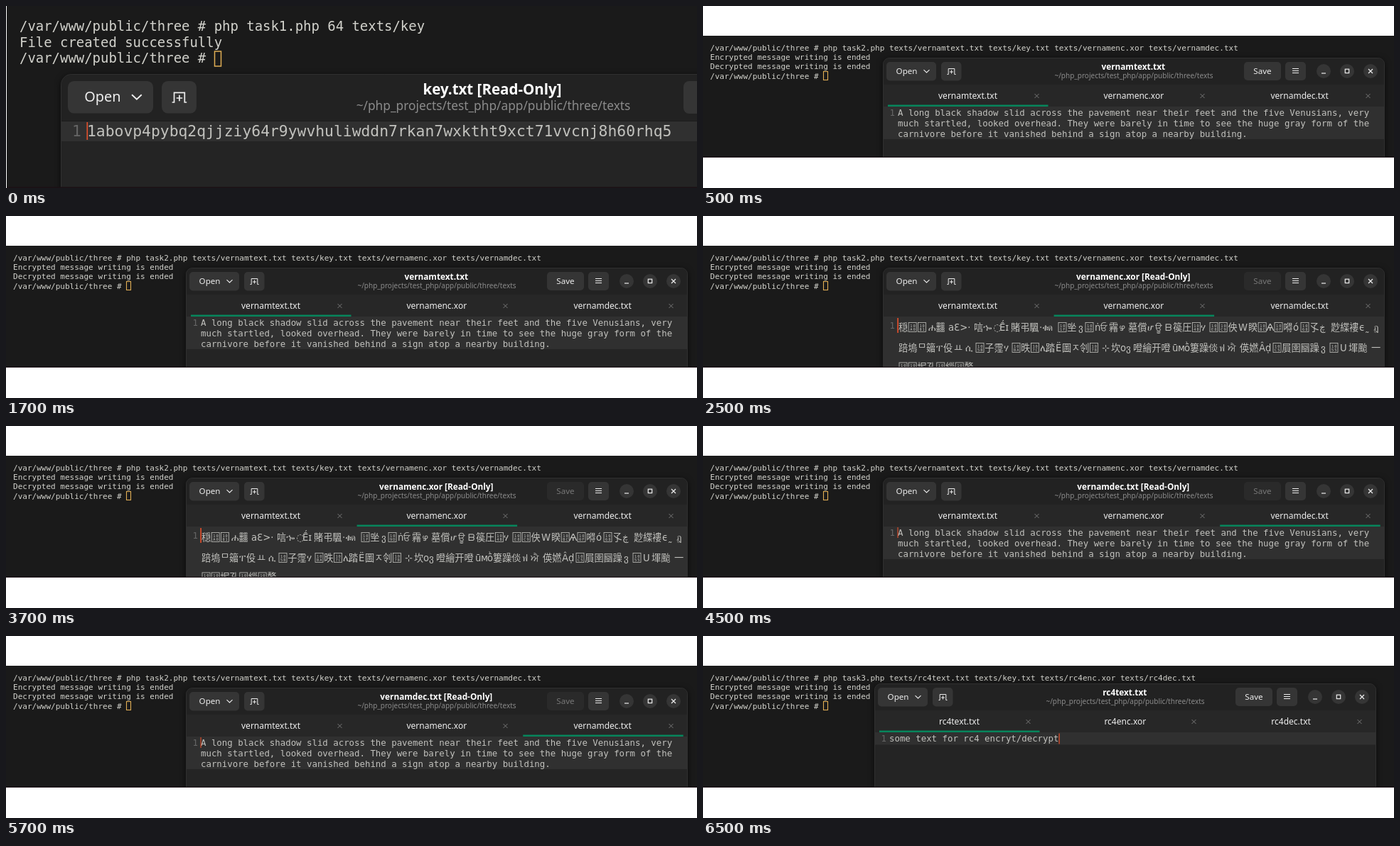
An HTML page with a canvas for the animation above (8000 ms loop, 972 by 257 pixels).

```html
<!DOCTYPE html>
<html lang="en">
<head>
<meta charset="utf-8">
<title>Cipher tasks</title>
<style>
html, body { margin: 0; width: 100%; height: 100%; overflow: hidden; background: #fff; }
canvas { display: block; width: 972px; height: 257px; }
</style>
</head>
<body>
<canvas id="stage" width="972" height="257"></canvas>
<script>
const ctx = document.getElementById('stage').getContext('2d');
const MONO = '"DejaVu Sans Mono", "Liberation Mono", monospace';
const SANS = '"Noto Sans", "Open Sans", sans-serif';
const MIXED = '"DejaVu Sans", "Noto Sans CJK SC", "Noto Sans CJK JP", "Noto Sans", sans-serif';
const C = {
  term: '#1a1a1a', termText: '#d2d2cc', caret: '#e0ae55', win: '#242424', line: '#303030',
  head: '#222222', edge: '#303030', button: '#353535', ui: '#eeeeee', dim: '#8b8b8b',
  text: '#c2c2be', number: '#666666', green: '#07855c', red: '#e8512c'
};
const PROMPT = '/var/www/public/three # ';
const FOLDER = '~/php_projects/test_php/app/public/three/texts';
const STORY = [
  'A long black shadow slid across the pavement near their feet and the five Venusians, very',
  'much startled, looked overhead. They were barely in time to see the huge gray form of the',
  'carnivore before it vanished behind a sign atop a nearby building.'
];

// Runs of mixed scripts; □ stands for a missing-glyph box.
const CIPHER = [
  [161.5, [[275, '穏□□'], [317, 'ሐ䨻'], [345, 'aԐ>·'], [381, '唁ኈ'], [408, '◌'], [417, 'Ḗɪ'],
    [433, '賭弔颿'], [473, '·ቁ'], [485, 'ด'], [499, '□㘴'], [528, 'ვ'], [537, '□'], [551, 'ṅ'],
    [559, 'ਓ'], [571, '霿'], [585, 'ഴ'], [598, '墓償'], [625, 'ሆ'], [636, 'ਊ'], [650, 'ᗷ'], [661, '篌圧□'],
    [700, 'ሃ'], [712, '□□佒'], [753, 'W'], [767, '睽□'], [792, 'Ѧ'], [803, '□嘚'], [830, 'ό'],
    [840, '□孓'], [867, 'ڿ'], [883, '尟緤褸'], [923, 'ϵ˷'], [943, 'ฎ']]],
  [190.5, [[275, '踣塢'], [302, 'ᄆ'], [314, '䉋'], [328, 'ፐ'], [338, '伇'], [353, 'ㅛ'],
    [369, 'ሲ'], [383, '□子霪'], [423, 'ሃ'], [434, '□昳□'], [474, 'ሊ'], [482, '踏'], [496, 'Ë'],
    [505, '圖ㅈ刢□'], [561, '⊹'], [574, '坎'], [587, 'o'], [595, 'ვ'], [605, '噔繪开噔'],
    [660, 'ū'], [668, 'м'], [677, 'ṑ'], [685, '簍躁倓'], [726, 'ฟ'], [738, 'ਐ'], [755, '偀㜣'],
    [782, 'Âḍ'], [801, '□屓圉圝躁'], [869, 'ვ'], [881, '□'], [896, 'Ս'], [908, '堚颱'], [940, '一']]],
  [218, [[275, '□□坭孔□緇□鷔']]]
];

function fill(color, x, y, w, h, r = 0) {
  ctx.fillStyle = color;
  ctx.beginPath();
  ctx.roundRect(x, y, w, h, r);
  ctx.fill();
}

function stroke(color, width, ...lines) {
  ctx.strokeStyle = color;
  ctx.lineWidth = width;
  ctx.beginPath();
  for (const points of lines) points.forEach(([x, y], i) => i ? ctx.lineTo(x, y) : ctx.moveTo(x, y));
  ctx.stroke();
}

function text(str, x, y, size, color, font = MONO, align = 'left', weight = 400) {
  ctx.font = `${weight} ${size}px ${font}`;
  ctx.textAlign = align;
  ctx.fillStyle = color;
  ctx.fillText(str, x, y);
}

function terminal(lines, x, y, size, step) {
  lines.forEach((line, i) => text(line, x, y + i * step, size, C.termText));
}

function caretBox(x, y, w, h, line) {
  ctx.strokeStyle = C.caret;
  ctx.lineWidth = line;
  ctx.strokeRect(x, y, w, h);
}

function frame(x, y, w, h, r) {
  ctx.save();
  ctx.shadowColor = 'rgba(0,0,0,.6)';
  ctx.shadowBlur = 9;
  ctx.shadowOffsetY = 2;
  fill(C.win, x, y, w, h, r);
  ctx.restore();
  ctx.strokeStyle = C.edge;
  ctx.lineWidth = 1;
  ctx.beginPath();
  ctx.roundRect(x + .5, y + .5, w - 1, h, r);
  ctx.stroke();
}

// Open and new-tab buttons, with the top left corner at the origin.
function openButtons() {
  fill(C.button, 0, 0, 70, 26.5, 5);
  text('Open', 13.6, 17.2, 11.6, C.ui, SANS);
  stroke(C.ui, 1.1, [[52.5, 11.2], [56.5, 15], [60.5, 11.2]]);
  fill(C.button, 77, 0, 28.5, 26.5, 5);
  stroke(C.ui, 1, [[85.5, 17.5], [87.2, 17.5], [87.2, 9.5], [95.8, 9.5], [95.8, 17.5], [97.5, 17.5]],
    [[91.5, 11.5], [91.5, 16.5]], [[89, 14], [94, 14]]);
}

function windowButtons(canSave) {
  fill(canSave ? C.button : '#2a2a2a', 761, 79, 52, 26, 5);
  text('Save', 787, 96.2, 11.6, canSave ? C.ui : '#777777', SANS, 'center');
  fill(C.button, 819, 79, 29, 26, 5);
  for (const y of [88.5, 91.5, 94.5]) stroke(C.ui, 1, [[829, y], [838, y]]);
  for (const x of [873, 906, 939]) fill(C.button, x - 10, 82, 20, 20, 10);
  stroke(C.ui, 1.2, [[870, 95], [876, 95]]);
  ctx.lineWidth = 1.2;
  ctx.strokeRect(903.3, 89.2, 5.4, 5.4);
  stroke(C.ui, 1.2, [[936, 89], [942, 95]], [[942, 89], [936, 95]]);
}

function tabs(names, active) {
  names.forEach((name, i) => {
    text(name, 372.5 + 233.3 * i, 131, 12, C.ui, SANS, 'center');
    const x = 469.5 + 233 * i;
    stroke('#777777', 1, [[x - 3, 124], [x + 3, 130]], [[x + 3, 124], [x - 3, 130]]);
  });
  fill(C.green, 260 + 233.6 * active, 139.4, 225.5, 2.6);
}

function missingBox(x, y, seed) {
  ctx.strokeStyle = C.text;
  ctx.lineWidth = .8;
  ctx.strokeRect(x + 1, y - 11, 11, 13);
  const hex = (seed * 37 % 256 + 4096).toString(16).toUpperCase();
  [...hex].forEach((c, i) => text(c, x + 3 + i % 2 * 4.2, y - 5 + (i >> 1) * 5.6, 5.4, C.text));
}

function cipherText() {
  for (const [y, runs] of CIPHER) {
    for (const [start, run] of runs) {
      let x = start;
      for (const glyph of run) {
        if (glyph === '□') {
          missingBox(x, y, x | 0);
          x += 13.2;
        } else {
          text(glyph, x, y, 13.2, C.text, MIXED);
          x += ctx.measureText(glyph).width;
        }
      }
    }
  }
}

function editor({ title, names, active, canSave, lines, caret, cipher, dx = 0, dy = 0 }) {
  ctx.save();
  ctx.translate(dx, dy);
  frame(253, 73, 706, 180, 9);
  fill(C.head, 254, 74, 704, 37, [8, 8, 0, 0]);
  fill('#272727', 254, 111, 704, 31);
  fill(C.line, 254, 142, 704, cipher ? 80 : lines.length * 15 + (lines.length > 1 ? 1 : 2.5));
  ctx.save();
  ctx.translate(258, 79);
  openButtons();
  ctx.restore();
  text(title, 605.3, 90, 11.8, '#ffffff', SANS, 'center', 700);
  text(FOLDER, 606, 102.4, 10, C.dim, SANS, 'center');
  windowButtons(canSave);
  tabs(names, active);
  text('1', 262.5, cipher ? 159 : 155, 12.39, C.number);
  if (cipher) cipherText();
  else lines.forEach((line, i) => text(line, 274, 155 + 15 * i, 12.39, C.text));
  if (caret) fill(C.red, ...caret);
  ctx.restore();
}

function keyScene() {
  fill(C.term, 1, 0, 971, 257);
  terminal([PROMPT + 'php task1.php 64 texts/key', 'File created successfully', PROMPT], 19, 35, 18.96, 22.6);
  caretBox(293.5, 64, 9, 21, 1.5);
  frame(77, 96, 920, 180, 15);
  fill(C.head, 78, 97, 900, 65, [14, 0, 0, 0]);
  fill('#1c1c1c', 78, 162, 900, 1);
  fill(C.line, 78, 163, 900, 28);
  ctx.save();
  ctx.translate(87, 106);
  ctx.scale(1.715, 1.715);
  openButtons();
  ctx.restore();
  fill(C.button, 953, 106, 60, 46, 8);
  text('key.txt [Read-Only]', 684, 125, 20.5, '#ffffff', SANS, 'center', 700);
  text(FOLDER, 685.5, 147, 17.3, C.dim, SANS, 'center');
  text('1', 93, 184, 21.35, C.number);
  text('1abovp4pybq2qjjziy64r9ywvhuliwddn7rkan7wxktht9xct71vvcnj8h60rhq5', 114, 184, 21.35, C.text);
  fill(C.red, 113.5, 164, 1.6, 25);
  fill('#1b1015', 1, 255.5, 971, 1.5);
}

function taskScene(command, view) {
  ctx.save();
  ctx.beginPath();
  ctx.rect(0, 42, 972, 172);
  ctx.clip();
  fill(C.term, 0, 42, 972, 172);
  terminal([PROMPT + command, 'Encrypted message writing is ended', 'Decrypted message writing is ended', PROMPT],
    10, 62.6, 11.02, 13.3);
  caretBox(169.5, 92.5, 6, 12, 1.1);
  editor(view);
  fill('#1b1015', 0, 213, 972, 1);
  ctx.restore();
}

const filesOf = id => [`${id}text.txt`, `${id}enc.xor`, `${id}dec.txt`];
const commandOf = (n, [a, b, c]) => `php task${n}.php texts/${a} texts/key.txt texts/${b} texts/${c}`;

const vernam = filesOf('vernam');
const rc4 = filesOf('rc4');
const vernamScene = view => taskScene(commandOf(2, vernam), { names: vernam, lines: STORY, ...view });

const scenes = [
  [500, keyScene],
  [2500, () => vernamScene({ title: vernam[0], active: 0, canSave: true })],
  [4500, () => vernamScene({ title: vernam[1] + ' [Read-Only]', active: 1, cipher: true, caret: [273.3, 144, 1.6, 21] })],
  [6500, () => vernamScene({ title: vernam[2] + ' [Read-Only]', active: 2, caret: [273.5, 143, 1.1, 15] })],
  [8000, () => taskScene(commandOf(3, rc4), {
    title: rc4[0], names: rc4, active: 0, canSave: true, dx: -12, dy: -6,
    lines: ['some text for rc4 encryt/decrypt'], caret: [512.5, 143.5, 1.2, 15]
  })]
];

const start = performance.now();
function draw() {
  const t = (performance.now() - start) % 8000;
  fill('#ffffff', 0, 0, 972, 257);
  scenes.find(([end]) => t < end)[1]();
  requestAnimationFrame(draw);
}
draw();
</script>
</body>
</html>
```
